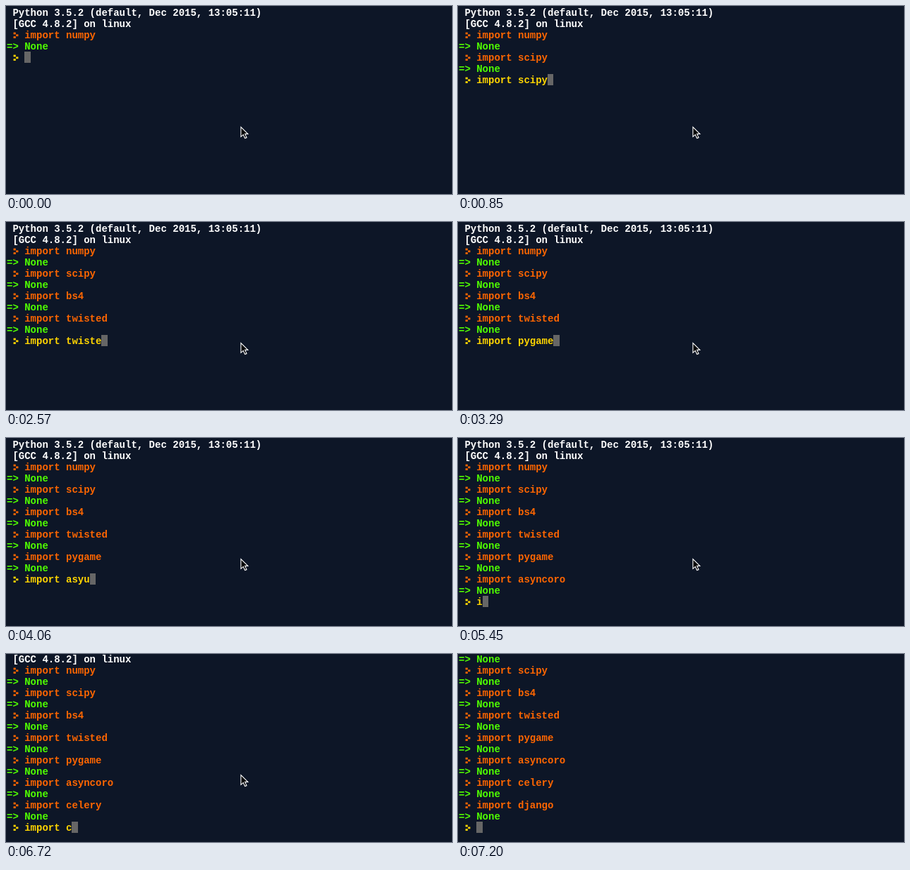
These frames come from a looping animation (632x268 px, 7390 ms). An HTML page:

```html
<!DOCTYPE html>
<html lang="en">
<head>
<meta charset="utf-8">
<title>Python console</title>
<style>
  html, body { margin: 0; width: 100%; height: 100%; overflow: hidden; background: #0d1627; }
  svg { display: block; width: 632px; height: 268px; }
  text { font: bold 14px "Liberation Mono", "Courier New", monospace; white-space: pre; }
</style>
</head>
<body>
<svg viewBox="0 0 632 268">
  <rect width="632" height="268" fill="#0d1627"/>
  <g id="screen"></g>
  <path id="mouse" d="M332.9 172.6V186.3L336.2 183.3L338.6 188.6L341 187.6L338.6 182.4H342.8Z"
    fill="#000" stroke="#fff" stroke-width="1.1"/>
</svg>
<script>
const NS = "http://www.w3.org/2000/svg";
const LOOP = 7390, MOUSE_OFF = 7200;
const CHAR = 8.4, LINE = 16, LEFT = 1, TOP = 1, LAST_TOP = 239;
const WHITE = "#fff", ORANGE = "#ff6600", GREEN = "#50ff00", YELLOW = "#ffd500", GRAY = "#666";

const screen = document.getElementById("screen");
const mouse = document.getElementById("mouse");
const keys = [];

// Keyboard script: each helper queues key presses at their times
const press = (time, key) => keys.push({ time, key });
const type = (text, ...times) => times.forEach((t, i) => press(t, text[i]));
const erase = (...times) => times.forEach(t => press(t, "DEL"));
const enter = t => press(t, "ENTER");
const recall = t => press(t, "UP");

recall(50);
erase(200, 250, 300, 350, 400);
type("scipy", 450, 500, 550, 600, 650);
enter(750);

recall(850);
erase(1000, 1050, 1100, 1150, 1200);
type("bs4", 1300, 1350, 1500);
enter(1550);

recall(1650);
erase(1700, 1750, 1800);
type("twisted", 1850, 1900, 1950, 2020, 2020, 2120, 2270);
enter(2320);

recall(2420);
erase(2570, 2620, 2670, 2720, 2770, 2810, 2960);
type("pygame", 3010, 3050, 3100, 3150, 3200, 3250);
enter(3350);

recall(3450);
erase(3520, 3570, 3620, 3670, 3720, 3860);
type("asyu", 3910, 4010, 4010, 4060);
erase(4260);
type("ncoro", 4410, 4450, 4900, 5050, 5100);
enter(5200);

type("import celery", 5450, 5490, 5540, 5600, 5600, 5650, 5750,
  5850, 5950, 6000, 6050, 6050, 6140);
enter(6240);

recall(6350);
erase(6490, 6540, 6590, 6640, 6690, 6740);
type("django", 6800, 6850, 6910, 6960, 7010, 7060);
enter(7150);

function stateAt(time) {
  const history = ["import numpy"];
  let input = "";
  for (const k of keys) {
    if (k.time > time) break;
    if (k.key === "ENTER") { history.push(input); input = ""; }
    else if (k.key === "UP") input = history[history.length - 1];
    else if (k.key === "DEL") input = input.slice(0, -1);
    else input += k.key;
  }
  return { history, input };
}

function add(tag, attrs, text) {
  const el = document.createElementNS(NS, tag);
  for (const name in attrs) el.setAttribute(name, attrs[name]);
  if (text) el.textContent = text;
  screen.appendChild(el);
}

const lineTop = row => TOP + row * LINE;
const cellX = col => LEFT + col * CHAR;

function write(row, col, text, fill) {
  if (text) add("text", { x: cellX(col), y: lineTop(row) + 13, fill }, text);
}

// Dotted chevron in the second column
function prompt(row, text, fill) {
  const y = lineTop(row);
  for (const [dx, dy] of [[10.6, 4.6], [14.2, 7.4], [10.6, 10.2]])
    add("rect", { x: dx, y: y + dy, width: 3.2, height: 2.8, fill });
  write(row, 3, text, fill);
}

// Block cursor with edges on whole pixels
function cursor(row, col) {
  const x = Math.round(cellX(col));
  const width = Math.round(cellX(col + 1)) - x;
  add("rect", { x, y: lineTop(row), width, height: LINE, fill: GRAY });
}

function draw({ history, input }) {
  screen.replaceChildren();
  write(0, 1, "Python 3.5.2 (default, Dec 2015, 13:05:11)", WHITE);
  write(1, 1, "[GCC 4.8.2] on linux", WHITE);
  history.forEach((line, i) => {
    prompt(2 + i * 2, line, ORANGE);
    write(3 + i * 2, 0, "=> None", GREEN);
  });
  const row = 2 + history.length * 2;
  prompt(row, input, YELLOW);
  cursor(row, 3 + input.length);
  const scroll = Math.max(0, lineTop(row) - LAST_TOP);
  screen.setAttribute("transform", `translate(0 ${-scroll})`);
}

let shown = "";
const start = performance.now();

function tick() {
  const time = (performance.now() - start) % LOOP;
  const state = stateAt(time);
  const stamp = state.history.length + state.input;
  if (stamp !== shown) {
    draw(state);
    shown = stamp;
  }
  mouse.style.display = time < MOUSE_OFF ? "" : "none";
  requestAnimationFrame(tick);
}
tick();
</script>
</body>
</html>
```
